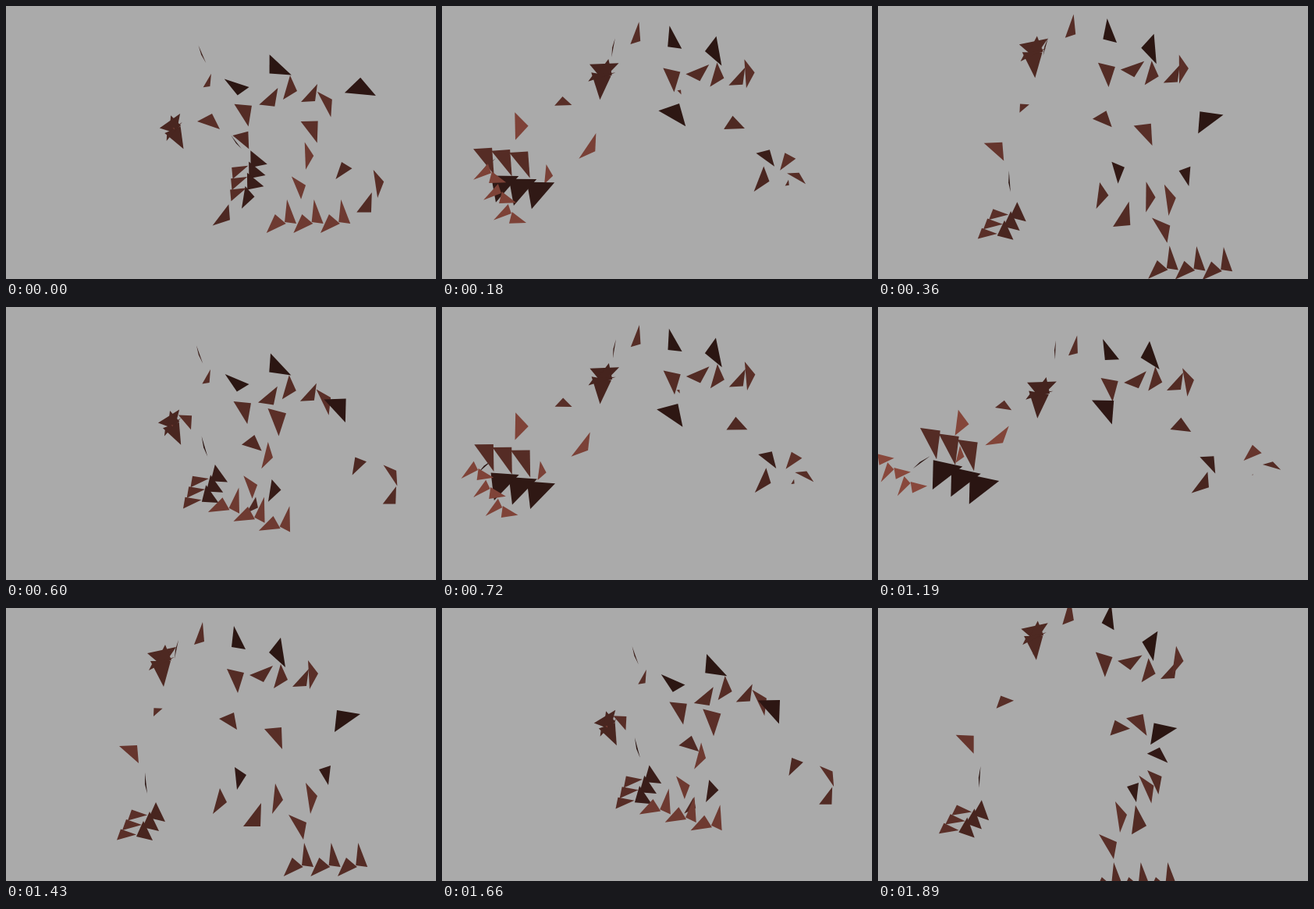
An HTML page with a canvas for the animation above (1.99 s loop, 551 px wide and 350 px high).

```html
<!DOCTYPE html>
<html lang="en">
<meta charset="utf-8">
<title>Galloping triangles</title>
<style>
html, body { margin: 0; width: 100%; height: 100%; overflow: hidden; background: #aaa }
canvas { display: block }
</style>
<canvas id="stage" width="551" height="350"></canvas>
<script>
const ctx = document.getElementById('stage').getContext('2d');
const LOOP = 1990, FRAMES = 33;

// A stride (0 to 1) has five key poses: folded, reaching, stretched, landing, pushing.
const STRIDE = [0, .11, .24, .54, .69], N = STRIDE.length;
const SWING = [1, .9, .27, -.45, 0];   // how far the trunk has dipped
const GLOW = [.5, .5, 1, 0, 0];        // light on limbs that reach forward
// The gallop runs at a slightly uneven pace: [ms, strides run].
const PACE = [[0, 0], [360, .655], [600, 1.11], [900, 1.62], [1190, 2.24], [1430, 2.69], [1890, 3.54], [1990, 3.72]];

const pieces = [];

// Two corners around a centre; the third balances them.
const tri = (ax, ay, bx, by, x = 0, y = 0) =>
  [[x + ax, y + ay], [x + bx, y + by], [x - ax - bx, y - ay - by]];

// A rigid set of triangles; each pose is x, y, turn in degrees, scale.
function piece(tone, glow, tris, ...poses) {
  poses = poses.map(([x, y, turn = 0, size = 1]) => [x, y, turn, size]);
  pieces.push({ tone, glow, tris, poses });
}

// A trunk triangle sways along a straight line with the dip of the back.
function trunk(tone, shape, [x, y], [dx, dy], turn = 0, shrink = 0) {
  piece(tone, 0, [shape], ...SWING.map(s => [x + dx * s, y + dy * s, turn * s, 1 - shrink * s]));
}

const row = (n, make) => Array.from({ length: n }, (_, i) => make(i, i - (n - 1) / 2));

// trunk and mane
trunk(.03, tri(3, -19, 9, 19), [349, 57], [-2, 22], -38);
trunk(.03, tri(-4, -19, 11, 11), [296, 42], [0, 62], -45);
trunk(.44, tri(-12, -12, 10, -7), [295, 90], [11, 46], -8);
trunk(.42, tri(-16, 1, 14, -11), [328, 85], [11, 35], -20);
trunk(.45, tri(0, -17, 9, 3), [352, 89], [12, 17]);
trunk(.42, tri(-13, 8, 8, -15), [380, 93], [11, 22]);
trunk(.5, tri(-5, -18, 8, -1), [392, 85], [19, 39], -25);
trunk(.46, tri(3, -18, 5, 7), [249, 36], [10, 62], 10, .35);
trunk(.2, tri(3, -12, -1, 0), [218, 53], [33, 9], -35);

// head
piece(.38, -.1, [
  [[-19, -10], [18, -18], [1, 7]], [[-15, 0], [11, 0], [2, 33]],
  [[4, -21], [12, -1], [-10, 6]], [[16, -5], [-12, 2], [-17, 12]],
], [215, 158, -23, .85], [213, 151, -20, .85], [208, 110, 10], [201, 36, 0, .93], [200, 68]);

// far foreleg
piece(.42, -.05, [tri(-14, -2, 5, -10)],
  [304, 170, 8], [316, 175, -14], [388, 153, -25], [308, 154, -50], [287, 144]);
piece(.1, .1, [tri(-6, -13, 9, -3)],
  [309, 245, 15], [343, 235, 15], [425, 199, -37], [359, 188, -60], [299, 217]);
piece(.42, -.1, [tri(0, -17, 9, 1)],
  [279, 270, 22], [317, 255, 15, .7], [416, 227, 22], [356, 221, -40], [274, 248]);

// near hind leg
piece(.03, .03, [tri(-9, -11, 21, -6)],
  [454, 106, 40], [426, 128, 82], [292, 130, 85], [362, 159, 3], [433, 142]);
piece(.48, .05, [tri(-15, -8, 7, -10)],
  [392, 157, 4], [348, 144, 20, 1.1], [300, 102, 0, .05], [334, 147, -8], [346, 163]);
piece(.5, .4, [tri(-2, -20, 8, 1)],
  [387, 192, -8, .9], [335, 191, 8, .9], [155, 168, 45], [346, 231, -30], [347, 245]);
piece(.5, .4, [tri(-14, -14, 9, -4)],
  [376, 232, 8, .85], [314, 230, 10, .85], [105, 190, 45, .6], [297, 304], [376, 279]);

// far hind leg
piece(.12, .5, [tri(-9, -5, 6, -10)],
  [432, 210, 50], [451, 202, 40], [480, 187, 60], [328, 234], [410, 212]);
piece(.54, -.1, [tri(-7, -19, 8, -2)],
  [477, 227, 0, .9], [495, 214, -25, .8], [505, 203, -65, .6], [311, 267], [391, 243]);
piece(.42, 0, [tri(8, -20, 7, 10)],
  [462, 256, 0, .85], [494, 245, 0, .75], [480, 215, 0, .05], [333, 274, -30], [319, 270]);

// near foreleg, down to its hoof
piece(.48, 0, [tri(-16, 0, 3, -10)],
  [261, 148], [232, 145, 30, .8], [161, 127, -10, .7], [161, 120, -43, .8], [193, 132, -60, .5]);
piece(.62, .3, [tri(-16, -7, 7, -8)],
  [215, 157, 0, .1], [213, 152, 0, .1], [106, 149, 56], [115, 171, 5], [161, 184]);
piece(.02, 0, [tri(-1, -14, 2, 13)],
  [295, 175, -32, .8], [254, 179, -10], [55, 199, 60], [130, 217, 10], [179, 225]);
const foreHoof = [[307, 219, -25], [253, 233, -10], [100, 199, 78, 1.75], [110, 272, 6], [172, 277]];
piece(.5, -.06, row(3, (i, k) => tri(-5, -7, 15, 0, -13 - 7 * k, 1 + 12.5 * k)), ...foreHoof);
piece(.32, -.3, row(3, (i, k) => tri(-1, -15, 11, 10, 13 - 8 * k, -1 + 12 * k)), ...foreHoof);

// hind hooves: flat and upright triangles in turn
piece(.44, .52, row(6, (i, k) => i % 2
  ? tri(-3, -20, 9, 11, 17.3 * k, -5)
  : tri(-12, 12, -1, -12, 17.3 * k, 6)),
  [389, 273], [317, 265, 20], [20, 212, -140, .8], [331, 351], [411, 326]);

const wrap = i => (i + N) % N;
const at = i => STRIDE[wrap(i)] + Math.floor(i / N);

// Smooth cyclic curve through the five values get(0) to get(4).
function curve(get, phase) {
  let i = N - 1;
  while (STRIDE[i] > phase) i--;
  const value = j => get(wrap(j));
  const slope = j => .7 * (value(j + 1) - value(j - 1)) / (at(j + 1) - at(j - 1));
  const span = at(i + 1) - at(i), u = (phase - at(i)) / span, v = 1 - u;
  return v * v * (1 + 2 * u) * value(i) + u * u * (3 - 2 * u) * value(i + 1)
    + span * u * v * (v * slope(i) - u * slope(i + 1));
}

function stride(ms) {
  let i = PACE.length - 2;
  while (PACE[i][0] > ms) i--;
  const [t0, p0] = PACE[i], [t1, p1] = PACE[i + 1];
  return (p0 + (p1 - p0) * (ms - t0) / (t1 - t0)) % 1;
}

// Start of step i: 60 ms each, three of them 10 ms shorter.
const stepStart = i => 60 * i - 10 * ((i > 17) + (i > 27) + (i > 30));

function draw(ms) {
  let step = FRAMES - 1;
  while (stepStart(step) > ms) step--;
  const phase = stride(stepStart(step));
  const light = curve(i => GLOW[i], phase);
  ctx.fillStyle = '#aaa';
  ctx.fillRect(0, 0, 551, 350);
  for (const { tone, glow, tris, poses } of pieces) {
    const [x, y, turn, size] = [0, 1, 2, 3].map(n => curve(i => poses[i][n], phase));
    const k = Math.max(0, tone + glow * light);
    const c = size * Math.cos(turn * Math.PI / 180), s = size * Math.sin(turn * Math.PI / 180);
    ctx.fillStyle = `rgb(${40 + 100 * k}, ${20 + 54 * k}, ${17 + 45 * k})`;
    for (const corners of tris) {
      ctx.beginPath();
      for (const [px, py] of corners) ctx.lineTo(x + c * px - s * py, y + s * px + c * py);
      ctx.fill();
    }
  }
}

const start = performance.now();
function tick() {
  draw((performance.now() - start) % LOOP);
  requestAnimationFrame(tick);
}
tick();
</script>
</html>
```
